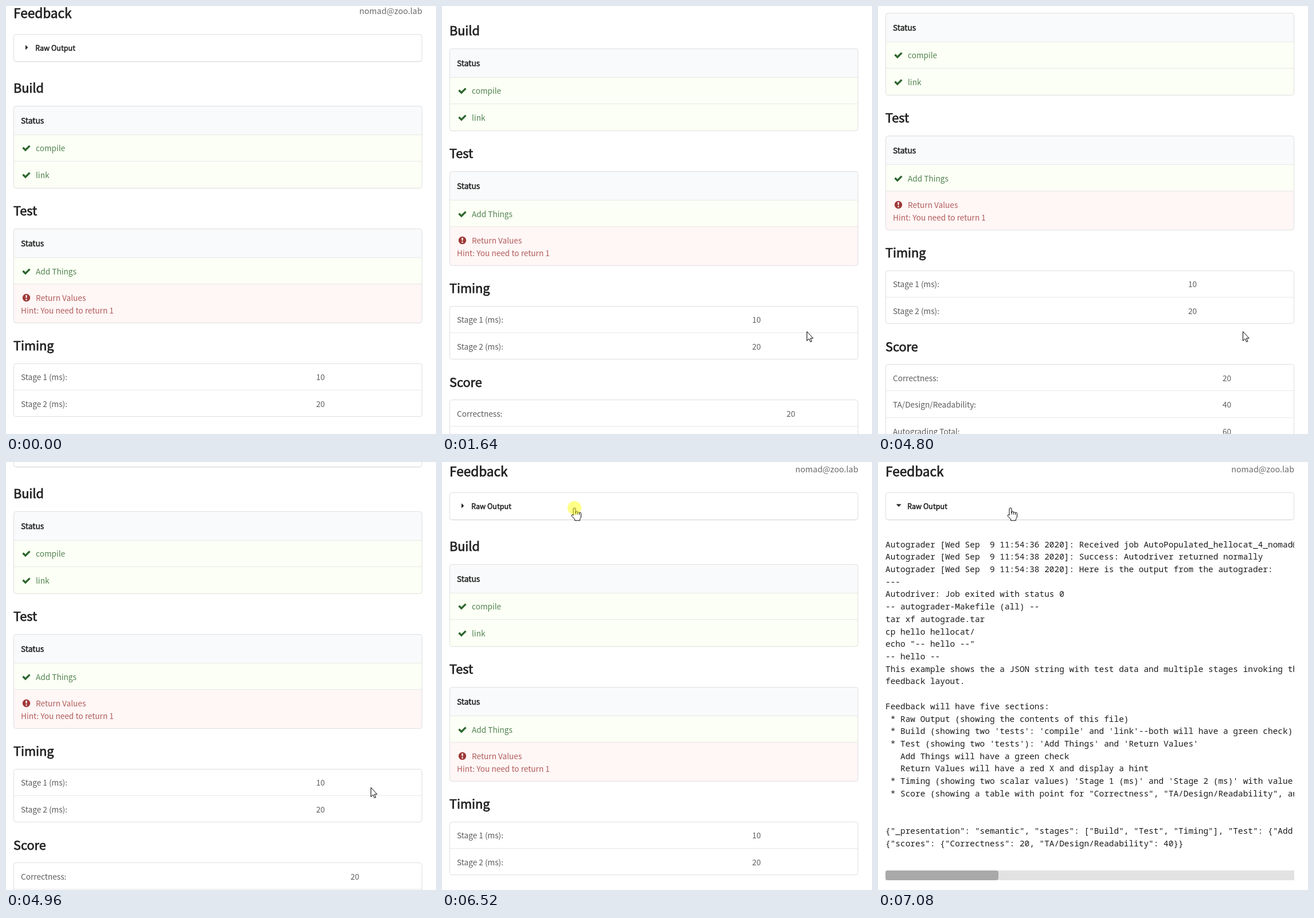
Write an HTML page that moves like this. It is 750x746 px and loops after 8000 ms.

```html
<!DOCTYPE html>
<html lang="en">
<head>
<meta charset="utf-8">
<title>Feedback</title>
<style>
html, body { margin: 0; width: 100%; height: 100%; overflow: hidden; background: #fff; }
svg { display: block; }
text { font: 300 13.65px "Noto Sans CJK JP", "Noto Sans CJK SC", "Noto Sans", sans-serif; fill: #383838; fill-opacity: .82; white-space: pre; }
.title, .label { font-weight: 400; fill: #212121; fill-opacity: 1; stroke: #212121; }
.title { font-size: 21.67px; stroke-width: .75px; }
.label { font-size: 13.79px; stroke-width: .5px; }
.good { fill: #2c662d; }
.bad { fill: #9f3a38; }
.mail { font-weight: 400; font-size: 14.3px; fill: #6b6b6b; fill-opacity: 1; text-anchor: end; }
.mono { font: 400 14.44px "Noto Sans Mono", "DejaVu Sans Mono", monospace; fill: #1c1c1c; fill-opacity: 1; }
.frame { fill: none; stroke: #dededf; }
.rule { stroke: #e8e8e9; }
</style>
</head>
<body>
<svg width="750" height="746" viewBox="0 0 750 746">
  <clipPath id="slot"><rect id="slotBox" x="13" y="108" width="713" height="0"/></clipPath>
  <g id="page">
    <g id="top"></g>
    <g clip-path="url(#slot)"><g id="raw"></g></g>
    <g id="results"></g>
  </g>
  <path id="arrow" d="M.5.5V16.5L4.2 13 6.7 18.5 9 17.5 6.6 12.1H11.3Z" fill="#fff" stroke="#000"/>
  <path id="hand" d="M3.5 13.5V2.5a2 2 0 0 1 4 0V9V7.5a1.8 1.8 0 0 1 3.3 0V9a1.7 1.7 0 0 1 3.2 0v1a1.5 1.5 0 0 1 3 0v5.5q0 2.5-2 4.5v2.5h-9v-2.5L.9 15q-1-2 .6-2.6 1-.3 2 1.1zM7.5 8v4M10.8 9v3M14 10v2.5"
    transform="translate(225.5 79.5)" fill="#fff" stroke="#000"/>
  <circle id="click" cx="231" cy="80" r="12" fill="#ff0" fill-opacity=".47"/>
</svg>
<script>
const $ = id => document.getElementById(id);
const put = (id, markup) => $(id).insertAdjacentHTML('beforeend', markup);
const text = (cls, x, y, str) => `<text class="${cls}" x="${x}" y="${y}">${str}</text>`;

const check = y => `<path class="good" d="M28.3 ${y} l2.4-2.4 3.2 3.2 6.4-6.4 2.3 2.3-8.7 8.7z"/>`;
const alertIcon = y => `<circle class="bad" cx="35.5" cy="${y}" r="6.7"/>
  <path d="M34.2 ${y - 4.6}h2.6l-.4 5.2h-1.8zM34.4 ${y + 2}h2.2v2.2h-2.2z" fill="#fff"/>`;

// A bordered table; edges are the row boundaries, fills the row backgrounds
function table(edges, fills = []) {
  const top = edges[0], bottom = edges[edges.length - 1];
  const bands = fills.map((fill, i) =>
    `<rect x="14" y="${edges[i]}" width="711" height="${edges[i + 1] - edges[i]}" fill="${fill}"/>`).join('');
  const rules = edges.slice(1, -1).map(y => `<path class="rule" d="M14 ${y}H725"/>`).join('');
  return bands + rules + `<rect class="frame" x="13.5" y="${top}" width="712" height="${bottom - top}" rx="4"/>`;
}
const section = (y, name) => text('title', 13, y, name);
const passed = (y, name) => check(y - 5) + text('good', 52, y, name);
const scalar = (y, name, x, value) => text('', 26, y, name) + text('', x, y, value);

const HEAD = '#f9fafb', GOOD = '#fcfff5', BAD = '#fff6f6';

put('top', `
  <text class="title" x="13" y="25" style="font-size:22.6px">Feedback</text>
  ${text('mail', 726, 18, 'nomad@zoo.lab')}
  <rect x="13.5" y="54.5" width="712" height="47" rx="4" fill="none" stroke="#eee"/>
  <rect x="13.5" y="53.5" width="712" height="47" rx="4" fill="#fff" stroke="#dededf"/>
  <path id="caret" fill="#212121"/>
  <text class="label" x="51" y="82" style="font-size:12.6px">Raw Output</text>`);

put('results',
  section(155, 'Build') + table([178.5, 228.5, 274.5, 321.5], [HEAD, GOOD, GOOD]) +
  text('label', 26, 209, 'Status') + passed(257, 'compile') + passed(304, 'link') +
  section(369, 'Test') + table([392.5, 442.5, 488.5, 556.5], [HEAD, GOOD, BAD]) +
  text('label', 26, 423, 'Status') + passed(472, 'Add Things') +
  alertIcon(512.5) + text('bad', 52, 518, 'Return Values') +
  text('bad', 26, 540, 'Hint: You need to return 1') +
  section(604, 'Timing') + table([627.5, 673.5, 719.5]) +
  scalar(656, 'Stage 1 (ms):', 541, 10) + scalar(703, 'Stage 2 (ms):', 541, 20) +
  section(768, 'Score') + table([790.5, 836.5, 883.5, 929.5]) +
  scalar(820, 'Correctness:', 601, 20) + scalar(866, 'TA/Design/Readability:', 601, 40) +
  scalar(913, 'Autograding Total:', 601, 60));

const log = `Autograder [Wed Sep  9 11:54:36 2020]: Received job AutoPopulated_hellocat_4_nomad@zoo.lab
Autograder [Wed Sep  9 11:54:38 2020]: Success: Autodriver returned normally
Autograder [Wed Sep  9 11:54:38 2020]: Here is the output from the autograder:
---
Autodriver: Job exited with status 0
-- autograder-Makefile (all) --
tar xf autograde.tar
cp hello hellocat/
echo "-- hello --"
-- hello --
This example shows the a JSON string with test data and multiple stages invoking the
feedback layout.

Feedback will have five sections:
 * Raw Output (showing the contents of this file)
 * Build (showing two 'tests': 'compile' and 'link'--both will have a green check)
 * Test (showing two 'tests'): 'Add Things' and 'Return Values'
   Add Things will have a green check
   Return Values will have a red X and display a hint
 * Timing (showing two scalar values) 'Stage 1 (ms)' and 'Stage 2 (ms)' with value
 * Score (showing a table with point for "Correctness", "TA/Design/Readability", and


{"_presentation": "semantic", "stages": ["Build", "Test", "Timing"], "Test": {"Add
{"scores": {"Correctness": 20, "TA/Design/Readability": 40}}`;
put('raw', log.split('\n').map((line, i) => text('mono', 13, Math.round(148.6 + i * 21.71), line)).join('') +
  `<rect x="13" y="712" width="713" height="17" fill="#e2e2e2"/>
   <rect x="13" y="712" width="197" height="17" rx="4" fill="#a9a9a9"/>`);

// Wheel scrolling: [time, offset], each held until the next
const scrolls = [[0, 4], [1440, 40], [1560, 87], [1640, 104], [1880, 139], [1960, 183], [2040, 201],
  [4800, 166], [4880, 124], [4960, 92], [5040, 50], [5120, 14], [5200, 0]];

const clamp = x => Math.min(1, Math.max(0, x));
const smooth = x => x * x * (3 - 2 * x);
const mix = (a, b, k) => a + (b - a) * k;
const show = (id, on) => $(id).setAttribute('visibility', on ? 'visible' : 'hidden');
const move = (id, x, y) => $(id).setAttribute('transform', `translate(${x} ${y})`);

function render(t) {
  move('page', 0, -scrolls.filter(s => s[0] <= t).pop()[1]);

  const enter = smooth(clamp(Math.floor((t - 280) / 80) / 3));
  const leave = smooth(clamp(Math.floor((t - 5680) / 72 + 1) / 6));
  move('arrow', Math.round(mix(mix(696, 636, enter), 231, leave)), Math.round(mix(mix(712, 567, enter), 80, leave)));
  show('arrow', t >= 280 && leave < 1);
  show('hand', leave === 1);
  show('click', t >= 6520 && t < 6680);

  // The panel opens in 80 ms ticks: height eases out, opacity is linear
  const open = t >= 6680;
  const tick = 6680 + Math.floor((t - 6680) / 80) * 80;
  const fade = !open ? 0 : t >= 7080 ? 1 : (tick - 6600) / 500;
  const grow = 1 - (1 - fade) ** 2;
  $('caret').setAttribute('d', open ? 'M31.7 73.5h9l-4.5 4.5z' : 'M34 72l4.3 4.2-4.3 4.2z');
  $('slotBox').setAttribute('height', 643 * grow);
  $('raw').setAttribute('opacity', fade);
  move('raw', 0, -Math.round(7 * (1 - grow)));
  move('results', 0, Math.round(643 * grow));
}

function loop() {
  render(performance.now() % 8000);
  requestAnimationFrame(loop);
}
loop();
</script>
</body>
</html>
```
